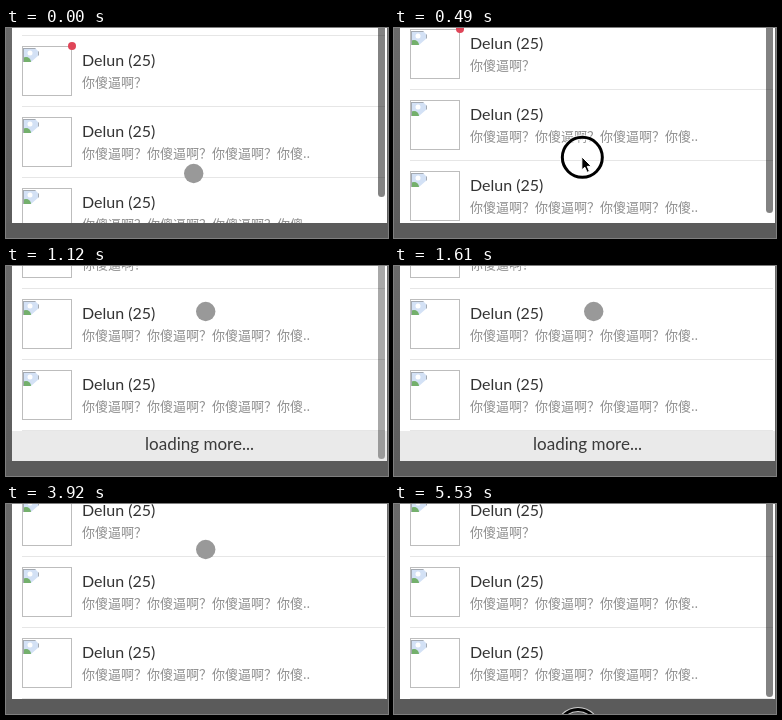
An HTML page with a canvas for the animation above (5600 ms loop, 382 by 210 pixels).

```html
<!DOCTYPE html>
<html lang="zh-CN">
<head>
<meta charset="utf-8">
<title>Pull up to load</title>
<style>
  html, body { margin: 0; width: 100%; height: 100%; overflow: hidden; background: #5b5b5b; }
  canvas { display: block; width: 382px; height: 210px; }
</style>
</head>
<body>
<canvas id="stage" width="382" height="210"></canvas>
<script>
const ctx = document.getElementById('stage').getContext('2d');
const W = 382, H = 210;
const LOOP = 5600, STEP = 70;
const LEFT = 6, RIGHT = 381, BOTTOM = 195;
const ROWS = 3, ROW_H = 71, FIRST = 18;
const NAME = 'Delun (25)';
const SHORT = '你傻逼啊\uff1f';
const LONG = SHORT.repeat(3) + '你傻..';
const LATIN = 'Lato, "Open Sans", sans-serif';
const CJK = '"Noto Sans CJK SC", "Noto Sans CJK", sans-serif';
const TEAR = new Path2D('M0 0H12L16 4V7L8 14H0Z');
const ARROW = new Path2D('M0 0V13L3 10.4L5.3 15.5L7.6 14.5L5.4 9.5H9.5Z');

// Progress from 0 to 1 between two times
const ramp = (t, from, to) => Math.min(1, Math.max(0, (t - from) / (to - from)));

// The list scrolls a little, is pulled past its end, then returns
const scrolled = t => 17 * (1 - (1 - ramp(t, 0, 280)) ** 2);
const pulled = t => 39 * ramp(t, 490, 840) ** 1.2 - 30 * ramp(t, 3710, 3920) ** 2.5;
const barAlpha = t => 1 - ramp(t, 910, 1610) + Math.sqrt(ramp(t, 4480, 4900));

function rect(x, y, w, h, color) {
  ctx.fillStyle = color;
  ctx.fillRect(x, y, w, h);
}

function circle(x, y, r, color) {
  ctx.beginPath();
  ctx.arc(x, y, r, 0, Math.PI * 2);
  ctx.fillStyle = color;
  ctx.fill();
}

function label(text, x, y, font, color, align = 'left') {
  ctx.font = font;
  ctx.textAlign = align;
  ctx.fillStyle = color;
  ctx.fillText(text, x, y);
}

function at(x, y, paint) {
  ctx.save();
  ctx.translate(x, y);
  paint();
  ctx.restore();
}

function backdrop() {
  const g = ctx.createLinearGradient(0, 0, 0, H);
  g.addColorStop(0, '#6a6a6a');
  g.addColorStop(1, '#5b5b5b');
  rect(0, 0, W, BOTTOM, g);
  rect(0, BOTTOM, W, H - BOTTOM, '#5b5b5b');
  rect(LEFT, 0, RIGHT - LEFT, BOTTOM, '#fff');
}

function brokenImage() {
  ctx.clip(TEAR);
  rect(0, 0, 16, 14, '#d3e1f5');
  circle(7, 5, 2.5, '#fff');
  circle(3, 14, 5, '#74b06c');
  ctx.strokeStyle = '#a4aab2';
  ctx.lineWidth = 2;
  ctx.strokeRect(0, 0, 16, 30);
}

function row(i, y) {
  rect(16, y - 11, 363, 1, '#e6e6e6');
  ctx.strokeStyle = '#bdbdbd';
  ctx.lineWidth = 1;
  ctx.strokeRect(16.5, y + 0.5, 49, 49);
  at(17, y + 2, brokenImage);
  if (i === 0) circle(66, y, 4, '#df4558');
  label(NAME, 76, y + 20, `16px ${LATIN}`, '#333');
  label(i === 0 ? SHORT : LONG, 76, y + 41, `13px ${CJK}`, '#8e8e8e');
}

function loader(y) {
  const h = BOTTOM - y;
  if (h < 2) return;
  rect(LEFT, y, RIGHT - LEFT, h, '#eaeaea');
  label('loading more...', 193.5, y + 10 + 0.3 * h, `17px ${LATIN}`, '#3a3a3a', 'center');
}

function scrollbar(t) {
  const end = t < 840 ? 169 + 0.94 * scrolled(t) : 193;
  ctx.beginPath();
  ctx.roundRect(372, -20, 7, end + 20, 3.5);
  ctx.fillStyle = `rgba(0,0,0,${0.49 * barAlpha(t)})`;
  ctx.fill();
}

const disc = (x, y) => circle(x - 0.3, y - 0.5, 9.7, '#999');

function ring(x, y) {
  ctx.beginPath();
  ctx.arc(x, y, 20, 0, Math.PI * 2);
  for (const [width, color] of [[5, 'rgba(255,255,255,.7)'], [3, '#000']]) {
    ctx.lineWidth = width;
    ctx.strokeStyle = color;
    ctx.stroke();
  }
}

function arrow() {
  ctx.fillStyle = '#000';
  ctx.fill(ARROW);
  ctx.strokeStyle = '#fff';
  ctx.lineWidth = 1;
  ctx.stroke(ARROW);
}

function pointer(t) {
  const drag = ramp(t, 420, 840);
  const x = 188 + 12 * drag ** 2;
  const y = 146 - 100 * drag + 104 * ramp(t, 4550, 4760);
  if (t >= 420 && t < 840) {
    ring(x, y);
    at(x - 0.5, y - 0.5, arrow);
  } else if (t < 4830) {
    disc(x, y);
  } else if (t >= 5530) {
    ring(184, 225.5);
  }
}

function draw(t) {
  const top = FIRST - Math.round(scrolled(t) + pulled(t));
  const end = top + ROWS * ROW_H - 11;
  backdrop();
  ctx.save();
  ctx.beginPath();
  ctx.rect(LEFT, 0, RIGHT - LEFT, BOTTOM);
  ctx.clip();
  for (let i = 0; i < ROWS; i++) row(i, top + i * ROW_H);
  rect(16, end, 363, 1, '#e6e6e6');
  loader(end + 1);
  scrollbar(t);
  ctx.restore();
  pointer(t);
}

const start = performance.now();
function tick() {
  const t = (performance.now() - start) % LOOP;
  draw(Math.floor(t / STEP) * STEP);
  requestAnimationFrame(tick);
}
tick();
</script>
</body>
</html>
```
